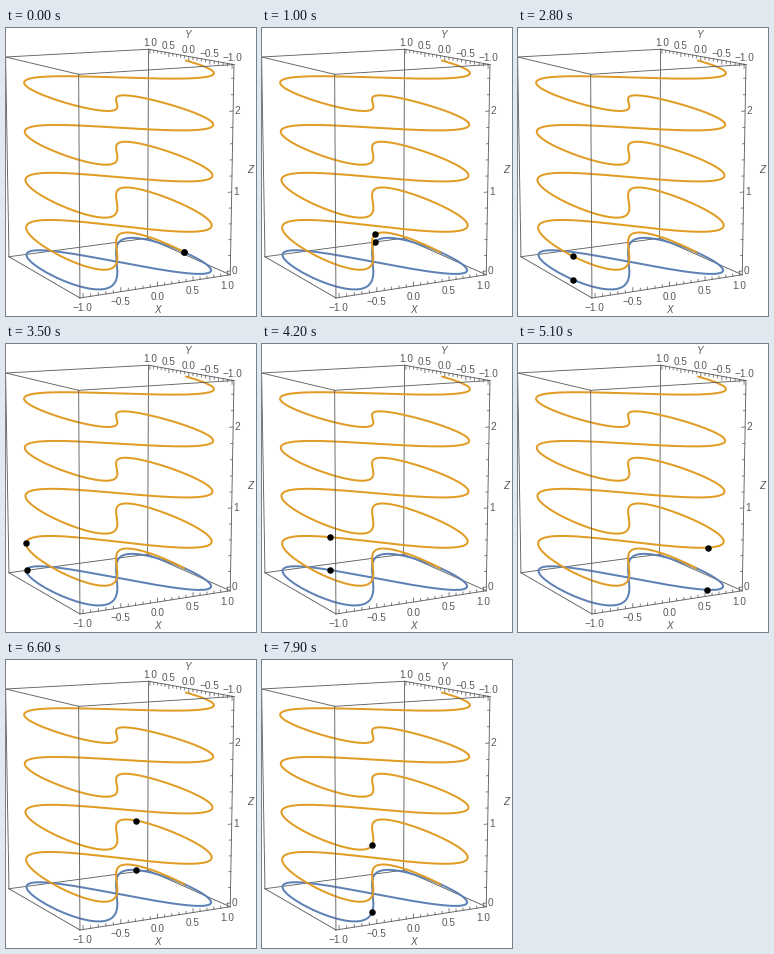
Animation of 250 by 288 pixels, one loop 8000 ms. Source, as a matplotlib script:

```python
import numpy as np
import matplotlib.pyplot as plt
from matplotlib.animation import FuncAnimation

W, H, DPI = 250, 288, 100
FRAMES, INTERVAL = 80, 100
STEP = 2 * np.pi / 60              # curve parameter per frame
PX = 72 / DPI                      # one pixel in points

BLUE = (0.368, 0.507, 0.710)
ORANGE = (0.881, 0.611, 0.142)
EDGE = "0.38"
INK = "0.35"
BORDER = "0.15"

# Camera: azimuth, elevation, distance, pixels per unit, screen centre
AZ, EL, DIST, SCALE = np.radians(28.1), np.arcsin(0.19), 15.8, 79.8
CX, CY = 110.7, 136.7

T_END = 8 * np.pi
Z_MID = T_END / 20
R = 1.04                           # padded half width of the box
Z_LO, Z_HI = -0.02 * T_END / 10, 1.02 * T_END / 10


def project(x, y, z):
    z = z - Z_MID
    right = np.cos(AZ) * x - np.sin(AZ) * y
    near = -np.sin(AZ) * x - np.cos(AZ) * y
    depth = np.cos(EL) * near + np.sin(EL) * z
    up = np.cos(EL) * z - np.sin(EL) * near
    k = SCALE / (1 - depth / DIST)
    return CX + k * right, CY - k * up


def curve(t, rise):
    return project(np.cos(t), np.sin(2 * t), rise * t / 10)


fig = plt.figure(figsize=(W / DPI, H / DPI), dpi=DPI, facecolor="white")
ax = fig.add_axes([0, 0, 1, 1])
ax.set_xlim(0, W)
ax.set_ylim(H, 0)
ax.axis("off")


def segment(p, q, z, width=0.9):
    (x0, y0), (x1, y1) = project(*p), project(*q)
    ax.plot([x0, x1], [y0, y1], color=EDGE, lw=width * PX, zorder=z)


def label(x, y, text, **style):
    ax.text(x, y, text, color=INK, fontsize=10 * PX, family="Liberation Sans",
            ha="center", va="center_baseline", zorder=8, **style)


def number(v):
    return f"{v:.1f}".replace("-", "\u2212")


def ticks(values, major, place, inward, offset, fmt):
    for i, v in enumerate(values):
        p = np.array(place(v))
        big = i % major == 0
        segment(p, p + np.array(inward) * (0.05 if big else 0.03), 7, 0.8)
        if big:
            x, y = project(*p)
            label(x + offset[0], y + offset[1], fmt(v))


# Box: the edges meeting at the near corner go in front of the curves
corners = [(-R, -R), (R, -R), (R, R), (-R, R)]
for i, (x, y) in enumerate(corners):
    nx, ny = corners[(i + 1) % 4]
    front = 6 if i in (0, 3) else 1
    segment((x, y, Z_LO), (nx, ny, Z_LO), front)
    segment((x, y, Z_HI), (nx, ny, Z_HI), front)
    segment((x, y, Z_LO), (x, y, Z_HI), 6 if i == 0 else 1)

unit = np.linspace(-1, 1, 21)
ticks(unit, 5, lambda v: (v, -R, Z_LO), (0, 0, 1), (-0.3, 9.8), number)
ticks(unit, 5, lambda v: (R, v, Z_HI), (0, 0, -1), (0, -7.7), number)
ticks(np.arange(13) * 0.2, 5, lambda v: (R, -R, v), (-1, 0, 0), (4.6, -0.8),
      lambda v: f"{v:.0f}")

label(151, 281, "X", style="italic")
label(182.5, 6.5, "Y", style="italic")
label(244.5, 141, "Z", style="italic")

# Thin border along the right and bottom of the stage
ax.plot([W - 0.5, W - 0.5, 0], [0, H - 0.5, H - 0.5], color=BORDER, lw=PX,
        solid_joinstyle="miter", zorder=9)

dots = []
for rise, color, end, z in ((0, BLUE, 2 * np.pi, 2), (1, ORANGE, T_END, 4)):
    ax.plot(*curve(np.linspace(0, end, 1600), rise), color=color,
            lw=2 * PX, zorder=z)
    dot, = ax.plot([], [], "o", color="black", ms=6.5 * PX, mew=0, zorder=z + 1)
    dots.append(dot)


def update(i):
    for rise, dot in enumerate(dots):
        x, y = curve(i * STEP, rise)
        dot.set_data([x], [y])
    return dots


anim = FuncAnimation(fig, update, frames=FRAMES, interval=INTERVAL,
                     repeat=True, repeat_delay=0)
plt.show()
```
